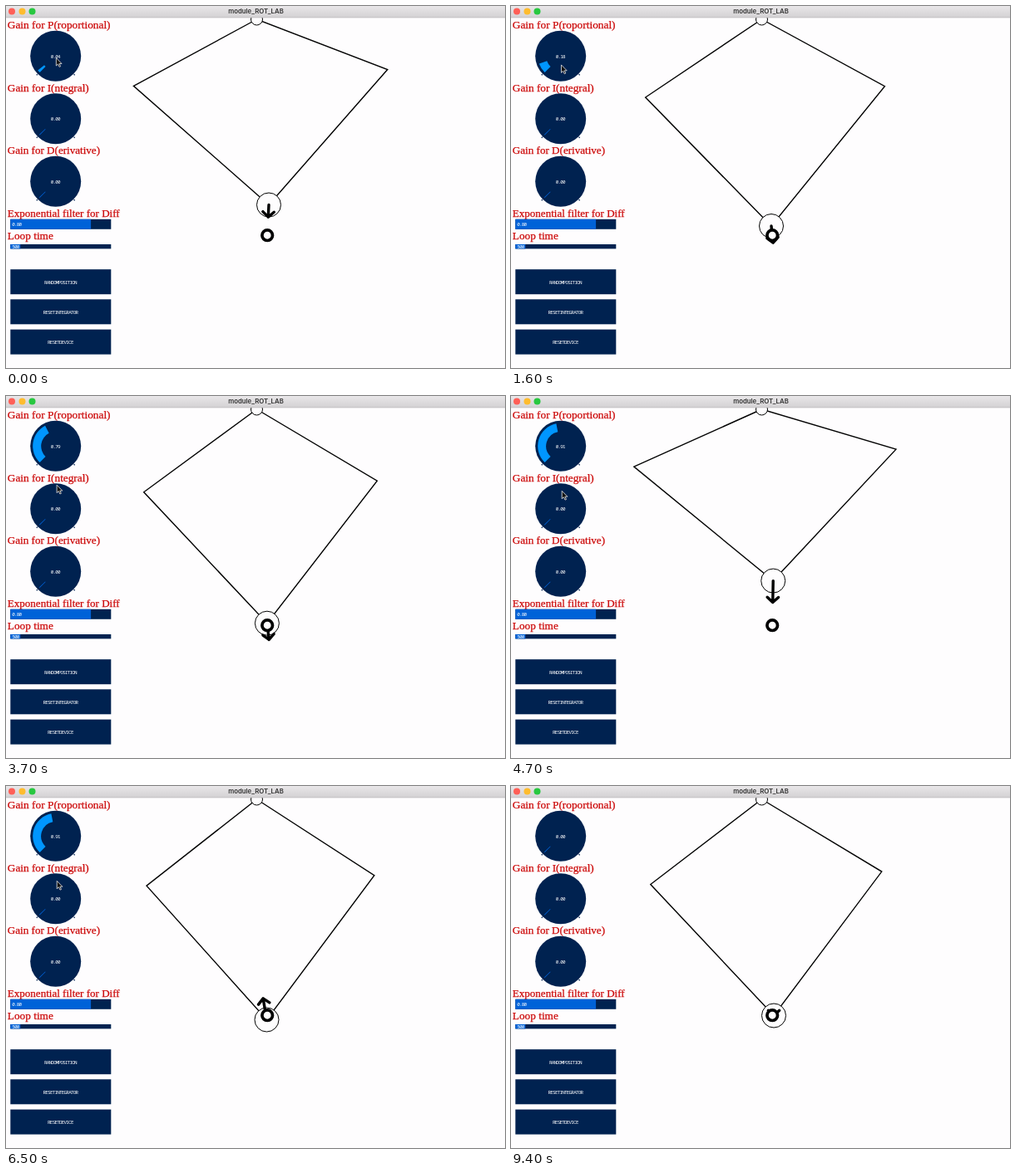
Animation of 600x436 px, one loop 9.5 s. Source, as an HTML page:

```html
<!DOCTYPE html>
<html lang="en">
<head>
<meta charset="utf-8">
<title>Linkage control</title>
<style>
  html, body { margin: 0; width: 100%; height: 100%; overflow: hidden; background: #fefdfe; }
  svg { display: block; width: 600px; height: 436px; }
  .label { font-family: "Liberation Serif", serif; fill: #cc0808; stroke: #cc0808; stroke-width: .25px; }
  .tiny { font: 6px "Noto Sans Mono", monospace; letter-spacing: -.82px; fill: #fff; }
  .mid { text-anchor: middle; }
  .title { font: 600 7.8px Inter, sans-serif; fill: #333; text-anchor: middle; }
  .arm { fill: none; stroke: #000; stroke-width: 1.4px; }
  .joint { fill: #fefdfe; stroke: #000; stroke-width: 1px; }
  .bold { fill: none; stroke: #000; stroke-width: 3.4px; stroke-linecap: round; stroke-linejoin: round; }
</style>
</head>
<body>
<svg viewBox="0 0 600 436">
  <defs>
    <linearGradient id="bar" x2="0" y2="1">
      <stop stop-color="#e9e7e9"/>
      <stop offset="1" stop-color="#d3d1d3"/>
    </linearGradient>
  </defs>
  <rect width="600" height="436" fill="#fefdfe"/>
  <g id="panel"></g>
  <path id="arms" class="arm"/>
  <circle class="joint" cx="301.5" cy="16" r="7"/>
  <circle id="hand" class="joint" r="14.5"/>
  <path id="arrow" class="bold"/>
  <circle cx="314.2" cy="276.2" r="6.3" fill="#fefdfe" stroke="#000" stroke-width="3.7"/>
  <rect width="600" height="14" fill="url(#bar)"/>
  <rect y="13.5" width="600" height=".8" fill="#bdbbbd"/>
  <circle cx="7" cy="6.5" r="4" fill="#ff5f57"/>
  <circle cx="19.5" cy="6.5" r="4" fill="#febc2e"/>
  <circle cx="31.5" cy="6.5" r="4" fill="#28c840"/>
  <text class="title" x="300.5" y="9.2">module_ROT_LAB</text>
  <path id="cursor" d="M0 0V9.4L2.2 7.4L3.8 10.8L5.3 10.1L3.8 6.9H6.7Z" fill="#111" stroke="#eee" stroke-width=".8"/>
</svg>
<script>
const LOOP = 9500, STEP = 100;
const BASE = [301.5, 16], GOAL = [314.2, 276.2];
const UPPER = 168.5, LOWER = 216.6;
const NAVY = '#002250', BLUE = '#0062d8', BRIGHT = '#0096ff';
const $ = id => document.getElementById(id);

// time, hand x, hand y, sideways aim
const HAND = [
  [0, 316, 239.5, 0], [1600, 313, 265, 0], [2600, 313.4, 271.5, 0],
  [3700, 313.9, 273.7, 0], [4300, 314, 273.8, 0], [5000, 316, 190, 0],
  [5150, 316, 185, 0], [5500, 312, 298, 0], [5800, 314, 266, 0],
  [6200, 313, 286, 0], [6500, 313.5, 281.5, -1.6], [6900, 315, 272, 0],
  [7300, 316.5, 274, 0], [7700, 316.2, 277, 0], [8100, 316, 276.5, 0]
];
// time, proportional gain
const GAIN = [
  [0, .04], [900, .09], [1600, .18], [2600, .5], [3400, .79], [3800, .79],
  [4300, .91], [8200, .91], [8800, 0]
];

const linear = u => u;
const smooth = u => (1 - Math.cos(Math.PI * u)) / 2;

function sample(keys, t, ease) {
  const i = keys.findIndex(k => k[0] > t);
  if (i < 0) return keys[keys.length - 1].slice(1);
  const a = keys[i - 1], b = keys[i];
  const u = ease((t - a[0]) / (b[0] - a[0]));
  return a.slice(1).map((v, j) => v + (b[j + 1] - v) * u);
}

const rect = (x, y, w, h, fill) =>
  `<rect x="${x}" y="${y}" width="${w}" height="${h}" fill="${fill}"/>`;
const label = (text, y, size) =>
  `<text class="label" x="1.8" y="${y}" font-size="${size}">${text}</text>`;
const tiny = (text, x, y, mid, id) =>
  `<text class="tiny${mid ? ' mid' : ''}" x="${x}" y="${y}"${id ? ` id="${id}"` : ''}>${text}</text>`;

function polar(cx, cy, r, deg) {
  const a = deg * Math.PI / 180;
  return [cx + r * Math.cos(a), cy + r * Math.sin(a)].map(v => v.toFixed(2)).join(' ');
}

// gain runs from 0 to 2 over 270 degrees
function wedge(cx, cy, value) {
  const a = 134, b = 136 + value * 135;
  return `M${polar(cx, cy, 27.5, a)}A27.5 27.5 0 0 1 ${polar(cx, cy, 27.5, b)}` +
    `L${polar(cx, cy, 17.5, b)}A17.5 17.5 0 0 0 ${polar(cx, cy, 17.5, a)}Z`;
}

function dial(cy, id) {
  const cx = 59.7;
  const ticks = [135, 45].map(a => `M${polar(cx, cy, 31, a)}L${polar(cx, cy, 32.5, a)}`).join('');
  return `<circle cx="${cx}" cy="${cy}" r="30.5" fill="${NAVY}"/>` +
    `<path d="${ticks}" stroke="${NAVY}" stroke-width="1.2"/>` +
    `<path id="${id}Arc" d="${wedge(cx, cy, 0)}" fill="${BLUE}"/>` +
    tiny('0.00', 59.3, cy + 2.6, true, id + 'Value');
}

function button(text, y) {
  return rect(5.3, y, 121, 30, NAVY) + tiny(text, 65.4, y + 17.3, true);
}

$('panel').innerHTML =
  label('Gain for P(roportional)', 27, 13.35) + dial(60.3, 'p') +
  label('Gain for I(ntegral)', 102.7, 13.27) + dial(135.8, 'i') +
  label('Gain for D(erivative)', 178.3, 13.1) + dial(211.3, 'd') +
  label('Exponential filter for Diff', 253.6, 13.05) +
  rect(5.3, 256.8, 121, 12, NAVY) + rect(5.3, 256.8, 96.8, 12, BLUE) + tiny('0.80', 7.2, 265.4) +
  label('Loop time', 281, 13.3) +
  rect(5.3, 287, 121, 5.4, NAVY) + rect(5.3, 287, 12, 5.4, BLUE) + tiny('500', 7.2, 291.9) +
  button('RANDOMPOSITION', 317.2) + button('RESETINTEGRATOR', 353.3) + button('RESETDEVICE', 389.6);

// elbow of the two-bar chain, side is -1 (left) or 1 (right)
function elbow(x, y, side) {
  const dx = x - BASE[0], dy = y - BASE[1], d = Math.hypot(dx, dy);
  const along = (d * d + UPPER * UPPER - LOWER * LOWER) / (2 * d);
  const off = side * Math.sqrt(UPPER * UPPER - along * along);
  return [BASE[0] + (dx * along + dy * off) / d, BASE[1] + (dy * along - dx * off) / d];
}

function draw(t) {
  const [x, y, aim] = sample(HAND, t, smooth);
  const [gain] = sample(GAIN, t, linear);

  $('arms').setAttribute('d', `M${BASE}L${elbow(x, y, -1)}L${x},${y}L${elbow(x, y, 1)}Z`);
  $('hand').setAttribute('cx', x);
  $('hand').setAttribute('cy', y);

  const ex = GOAL[0] + aim - x, ey = GOAL[1] - y;
  const force = Math.min(26, 10 * gain * Math.hypot(ex, ey));
  const turn = force > .01 ? Math.atan2(-ex, ey) * 180 / Math.PI : 0;
  $('arrow').setAttribute('d', `M0 0V${force}M-6.7 ${force - 6.2}L0 ${force}L6.7 ${force - 6.2}`);
  $('arrow').setAttribute('transform', `translate(${x} ${y}) rotate(${turn})`);

  const held = t < 9000;
  $('pArc').setAttribute('d', wedge(59.7, 60.3, gain));
  $('pArc').setAttribute('fill', held ? BRIGHT : BLUE);
  $('pValue').textContent = gain.toFixed(2);
  $('cursor').setAttribute('transform', `translate(${60.3 + gain} ${60.2 + gain * 59.5})`);
  $('cursor').style.display = held ? '' : 'none';
}

const start = performance.now();
function tick() {
  const t = (performance.now() - start) % LOOP;
  draw(Math.floor(t / STEP) * STEP);
  requestAnimationFrame(tick);
}
tick();
</script>
</body>
</html>
```
